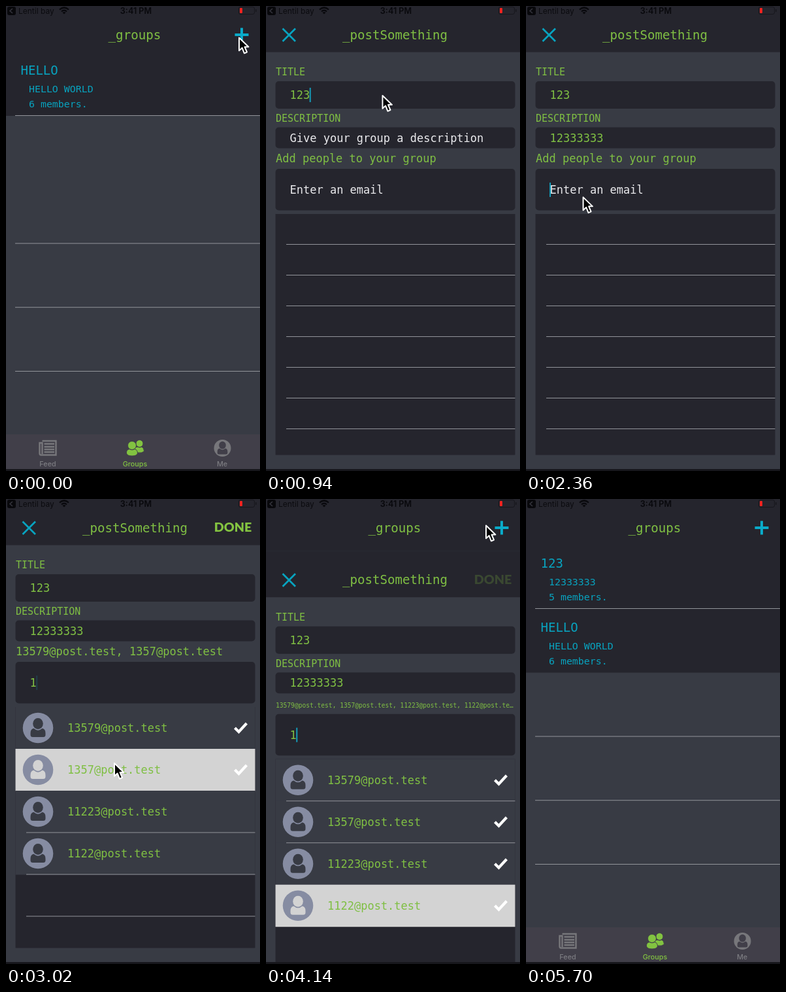
An HTML page that plays this animation: 389x711 px, repeating every 5720 ms.

```html
<!DOCTYPE html>
<html lang="en">
<head>
<meta charset="utf-8">
<style>
  html, body { margin: 0; width: 100%; height: 100%; overflow: hidden; background: #25252d; }
  svg { display: block; width: 389px; height: 711px; }
  text { white-space: pre; }
  .mono { font-family: "DejaVu Sans Mono", monospace; }
  .sans { font-family: Inter, sans-serif; }
</style>
</head>
<body>
<svg id="stage" viewBox="0 0 389 711"></svg>
<script>
const LOOP = 5720;
const DARK = '#25252d', GRAY = '#383b44', GREEN = '#7fbf43', CYAN = '#08a3bf', WHITE = '#e9e9ec';
const CHAR = 10.235; // advance of a 17px monospaced glyph
const PLACEHOLDER = 'Add people to your group';
const PEOPLE = ['13579@post.test', '1357@post.test', '11223@post.test', '1122@post.test'];
const PICK_TIMES = [2800, 2990, 3300, 3560];
const RESULTS_AT = 2560, DONE_AT = 4040, INSERT_AT = 4400, CURSOR_OFF = 5240;

const FIELDS = [
  { id: 'title', y: 142, hint: 'Give your group a title', value: '123', focus: 600, blur: 1250, start: 700, step: 85 },
  { id: 'desc', y: 207.5, hint: 'Give your group a description', value: '12333333', focus: 1250, blur: 2230, start: 1400, step: 85 },
  { id: 'email', y: 287, hint: 'Enter an email', value: '1', focus: 2230, blur: LOOP, start: 2480, step: 85 },
];

// Pointer stops: time, x, y
const POINTER = [
  [0, 357, 48.5], [220, 357, 48.5], [580, 190, 130], [760, 178.5, 137], [1020, 178.5, 137],
  [1230, 172, 198], [1900, 170, 200], [2200, 89, 292], [2450, 87, 292.5], [2760, 160, 345],
  [2860, 163, 352], [2970, 166, 404], [3060, 166, 404], [3270, 163, 470], [3360, 163, 472],
  [3530, 160, 537], [3640, 160, 537], [3980, 337, 40.5], [4200, 337, 40.5], [4600, 328, 83], [5720, 328, 83],
];

const mono = (x, y, size, fill, str, extra = '') =>
  `<text class="mono" x="${x}" y="${y}" font-size="${size}" fill="${fill}" ${extra}>${str}</text>`;
const sans = (x, y, size, fill, str, weight = 500) =>
  `<text class="sans" x="${x}" y="${y}" font-size="${size}" fill="${fill}" font-weight="${weight}" text-anchor="middle">${str}</text>`;
const rect = (x, y, w, h, fill, extra = '') =>
  `<rect x="${x}" y="${y}" width="${w}" height="${h}" fill="${fill}" ${extra}/>`;
const line = (x1, y, x2, extra = '') =>
  `<path d="M${x1} ${y}H${x2}" stroke="#92949a" ${extra}/>`;
const range = n => [...Array(n).keys()];

const entry = (id, name, about, members) => `<g id="${id}">
  ${mono(22.5, 105, 19, CYAN, name)}${mono(35, 132, 14.9, CYAN, about)}
  ${mono(35, 155, 14.9, CYAN, members + ' members.')}</g>`;

const person = (x, y, scale = 1) => `<g transform="translate(${x} ${y}) scale(${scale})">
  <ellipse cy="-6.500" rx="7.800" ry="8.500"/>
  <path d="M-11.500 8Q-11.500 1.500-6.500 .800Q0 6.500 6.500 .800Q11.500 1.500 11.500 8V10.500Q11.500 14 8 14H-8Q-11.500 14-11.500 10.500Z"/></g>`;

const groupsPage = () => `
  ${rect(0, 0, 389, 711, GRAY)}
  <rect id="filled" width="389" fill="${DARK}"/>
  ${mono(197, 50.5, 19.2, GREEN, '_groups', 'text-anchor="middle"')}
  <path d="M350.500 44H371.500M361 33.500V54.500" stroke="#0aabc9" stroke-width="4"/>
  ${entry('added', '123', '12333333', 5)}${entry('hello', 'HELLO', 'HELLO WORLD', 6)}
  ${[0, 2, 3, 4].map(i => line(14, 167.5 + i * 97.75, 389)).join('')}
  ${rect(0, 655, 389, 56, '#413f49')}
  <g fill="none" stroke="#77777b" stroke-width="2.400">
    <path d="M55.500 665H76.500V686.500H53.500Q51.500 686.500 51.500 684V668H55.500V685"/>
    <path d="M58.500 669.500H74M58.500 674H74M58.500 678H74M58.500 682H74"/>
  </g>
  <g fill="#82c341" stroke="#413f49">
    <circle cx="204.500" cy="669" r="5.500"/>
    <path d="M197 681Q196 675 201 674Q205 676 208 674Q211.500 676 211.500 681Q208 684 202 683Z"/>
    <circle cx="193" cy="672" r="6.500"/>
    <path d="M184.500 684Q184 678.500 189 677.500Q193 680 197 677.500Q201.500 678.500 201.500 684Q200 688 193 688Q186 688 184.500 684Z"/>
  </g>
  <circle cx="331.500" cy="676" r="13" fill="#77777b"/>
  <g fill="#413f49">${person(331.5, 676, .68)}</g>
  ${sans(64, 704, 10.8, '#7b7b80', 'Feed')}${sans(197.5, 704, 10.8, '#82c341', 'Groups')}${sans(331, 704, 10.8, '#7b7b80', 'Me')}`;

const resultRow = (mail, i) => `<g transform="translate(0 ${318 + i * 64})">
  <rect id="row${i}" x="14.500" width="367" height="64.500"/>
  <circle cx="49" cy="32" r="23.300" fill="#868ca2"/>
  <g id="face${i}">${person(49, 32)}</g>
  ${mono(94, 38, 17, GREEN, mail)}
  <path id="check${i}" d="M350.500 32L356.500 38L368.500 25" fill="none" stroke="#fff" stroke-width="4.200"/></g>`;

const formPage = () => `<g id="form">
  ${rect(0, 0, 389, 711, GRAY)}${rect(0, 0, 389, 70.5, DARK)}
  <path d="M25.500 34.500L45 54M45 34.500L25.500 54" stroke="${CYAN}" stroke-width="2.800"/>
  ${mono(197.5, 50.5, 19.1, GREEN, '_postSomething', 'text-anchor="middle"')}
  <text id="done" x="347.500" y="50" font-family="Lato, sans-serif" font-weight="900" font-size="19.700" fill="#84c441" text-anchor="middle">DONE</text>
  ${mono(15, 106, 15, GREEN, 'TITLE')}${mono(15, 177, 15, GREEN, 'DESCRIPTION')}
  <text id="caption" class="mono" x="15" y="239" fill="${GREEN}"></text>
  ${[[115, 42], [185.5, 32], [249, 63.5]].map(([y, h]) => rect(14.5, y, 367, h, DARK, 'rx="5"')).join('')}
  ${FIELDS.map(f => mono(36.5, f.y, 17, WHITE, '', `id="${f.id}"`)).join('')}
  <rect id="caret" width="2" height="22" fill="#149bb8"/>
  ${rect(14.5, 318, 367, 368.5, DARK)}
  <g id="blank">${range(7).map(i => line(31, 364.5 + i * 47, 381.5)).join('')}</g>
  <g id="results">${PEOPLE.map(resultRow).join('')}
    ${range(5).map(i => line(31, 382 + i * 64, 381.5, `id="sep${i}"`)).join('')}</g>
</g>`;

const statusBar = () => `
  ${rect(2, 1, 13, 13, '#08080b', 'rx="3"')}
  <path d="M10 4L6 7.500L10 11" fill="none" stroke="#34343c" stroke-width="1.600"/>
  <text class="sans" x="19" y="11.500" font-size="12" fill="#0b0b0f">Lentil bay</text>
  ${sans(199, 11.5, 12.6, '#08080c', '3:41 PM', 600)}
  <g fill="none" stroke="#08080c" stroke-width="2.200"><path d="M82 5.500Q89 -.500 96 5.500M85 8.300Q89 4.800 93 8.300"/></g>
  <path d="M86.500 10Q89 8 91.500 10L89 12.500Z" fill="#08080c"/>
  ${rect(356.5, 1.5, 24, 11, 'none', 'rx="2.500" stroke="#17171c"')}${rect(382, 5, 1.5, 4, '#17171c')}
  ${rect(358, 3, 4, 8, '#f3221f', 'rx="1"')}`;

document.getElementById('stage').innerHTML = `${groupsPage()}${formPage()}${statusBar()}
  ${rect(0, 708, 389, 3, '#17171c')}
  <path id="pointer" d="M0 0V19.800L4.600 15.500L8 23.800L12 22L8.600 14H14.400Z" fill="#000" stroke="#fff" stroke-width="2" stroke-linejoin="round"/>`;

const el = {};
document.querySelectorAll('[id]').forEach(node => { el[node.id] = node; });
const set = (id, attrs) => { for (const key in attrs) el[id].setAttribute(key, attrs[key]); };
const show = (id, on) => set(id, { visibility: on ? 'inherit' : 'hidden' });
const write = (id, str) => { if (el[id].textContent !== str) el[id].textContent = str; };
const clamp = v => Math.max(0, Math.min(1, v));
const smooth = v => { v = clamp(v); return v * v * (3 - 2 * v); };

function pointerAt(t) {
  const i = Math.max(1, POINTER.findIndex(p => p[0] >= t));
  const [t0, x0, y0] = POINTER[i - 1], [t1, x1, y1] = POINTER[i];
  const k = smooth((t - t0) / (t1 - t0));
  return [x0 + (x1 - x0) * k, y0 + (y1 - y0) * k];
}

function caretOpacity(elapsed) {
  const phase = elapsed % 800;
  return phase < 650 ? 1 - clamp((phase - 470) / 90) : clamp((phase - 700) / 90);
}

function drawFields(t) {
  for (const f of FIELDS) {
    const typed = Math.max(0, Math.min(f.value.length, Math.floor((t - f.start) / f.step) + 1));
    write(f.id, typed ? f.value.slice(0, typed) : f.hint);
    set(f.id, { fill: typed ? GREEN : WHITE });
    if (t >= f.focus && t < f.blur) {
      const lastKey = typed ? f.start + (typed - 1) * f.step : f.focus;
      set('caret', { x: 36 + typed * CHAR, y: f.y - 17, opacity: caretOpacity(t - lastKey) });
    }
  }
  show('caret', t >= FIELDS[0].focus);
}

function drawResults(t) {
  const listed = t >= RESULTS_AT;
  const picked = PICK_TIMES.filter(p => t >= p).length;
  show('blank', !listed);
  show('results', listed);
  PEOPLE.forEach((_, i) => {
    const fill = i === picked - 1 ? '#d3d3d3' : GRAY;
    set('row' + i, { fill });
    set('face' + i, { fill });
    show('check' + i, listed && i < picked);
  });
  range(5).forEach(i => show('sep' + i, listed && (!picked || (i !== picked - 1 && i !== picked - 2))));

  const full = picked ? PEOPLE.slice(0, picked).join(', ') : PLACEHOLDER;
  write('caption', full.length > 63 ? full.slice(0, 62) + '…' : full);
  set('caption', { 'font-size': Math.max(9.6, Math.min(17, 366 / full.length / .602)) });
  show('done', picked > 0);
  set('done', { opacity: t >= DONE_AT ? .22 : 1 });
}

function render(t) {
  const inserted = t >= INSERT_AT;
  set('filled', { height: inserted ? 265.5 : 168 });
  set('hello', { transform: `translate(0 ${inserted ? 97.75 : 0})` });
  show('added', inserted);

  const offset = 711 * (1 - smooth((t - 10) / 420) + smooth((t - 4066) / 360));
  set('form', { transform: `translate(0 ${offset.toFixed(2)})` });
  drawFields(t);
  drawResults(t);

  set('pointer', { transform: `translate(${pointerAt(t).map(v => v.toFixed(2)).join(' ')})` });
  show('pointer', t < CURSOR_OFF);
}

const began = performance.now();
function tick() {
  render((performance.now() - began) % LOOP);
  requestAnimationFrame(tick);
}
tick();
</script>
</body>
</html>
```
